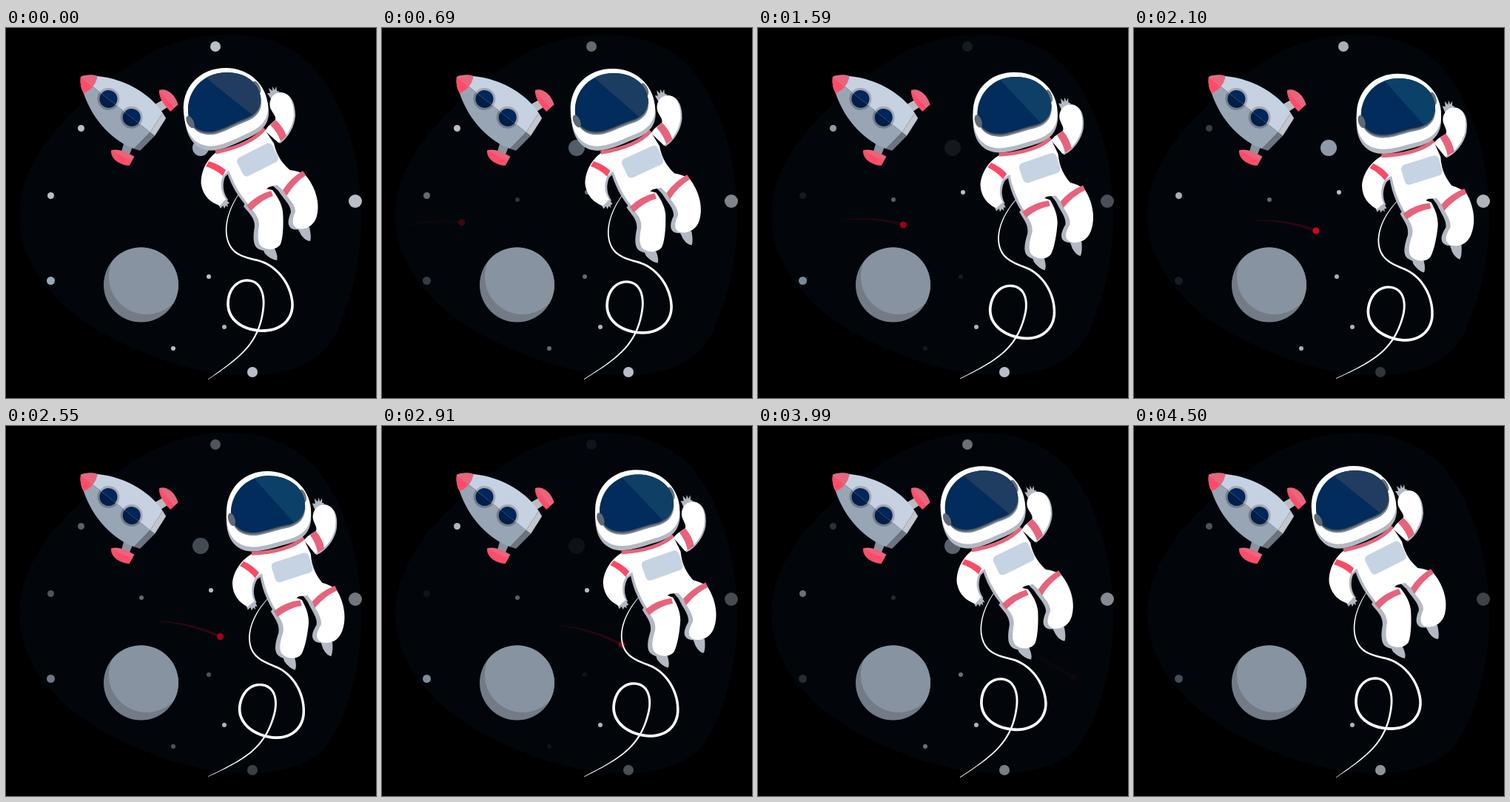
Animation, 500 px wide and 500 px high, one loop 4.53 s. Source, as an HTML page:

```html
<!DOCTYPE html>
<html lang="en">
<head>
<meta charset="utf-8">
<title>Floating astronaut</title>
<style>
html, body { margin: 0; width: 100%; height: 100%; overflow: hidden; background: #000; }
svg { display: block; width: 100%; height: 100%; }
.lit { --hull: #c6d2e2; --tail: #c4c6cf; --neck: #b9bdc4; --nose: #e8657d; --in: #ff4d69; --out: #e8657d; --rim: #a5a8ae; --glass: #00265c; }
.dim { --hull: #98a5b5; --tail: #6c757f; --neck: #8b949e; --nose: #ff4d69; --in: #e8657d; --out: #ff4d69; --rim: #737c87; --glass: #031d4a; }
</style>
</head>
<body>
<svg viewBox="0 0 500 500">
  <defs>
    <clipPath id="planetClip"><circle cx="182.500" cy="347" r="50.500"/></clipPath>
    <clipPath id="visorClip"><use href="#visor"/></clipPath>
    <path id="visor" d="M246 112C245 85 265 61 297 60C322 59 341 73 344 93C345 108 338 117 322 123C308 128 298 135 284 139C262 144 247 133 246 112Z"/>
    <path id="helmet" d="M240 114C237 80 262 54 297 54C330 54 352 78 354 105C355 127 341 136 325 143C305 152 287 162 270 159C251 155 242 138 240 114Z"/>
    <path id="armL" d="M284 168C268 180 262 200 264 213C267 228 277 236 289 240L297 231C290 222 289 210 293 200L308 186Z"/>
    <path id="armR" d="M350 139L368 155C380 147 388 132 389 117C389 103 384 87 371 87C358 88 354 101 358 110C361 116 365 119 364 124L354 133Z"/>
    <path id="legL" d="M327 239C334 248 342 254 342 266C340 278 339 291 346 296C354 301 366 300 371 292C375 282 375 260 374 248C372 235 366 227 360 219L340 215Z"/>
    <path id="legR" d="M374 219C381 230 391 238 391 248C386 260 386 268 394 271C403 273 416 269 420 254C425 235 417 213 404 198Q394 193 384 192L362 208Z"/>

    <!-- One side of the rocket, nose at the origin, axis along x -->
    <g id="side">
      <path fill="var(--neck)" d="M100 30L107 47L118 44L113 28Z"/>
      <path fill="var(--in)" d="M94 52C99 44 113 40 124 39L126 53Z"/>
      <path fill="var(--out)" d="M94 52L125 46L126 53C113 62 99 60 94 52Z"/>
      <path fill="var(--hull)" d="M0 0C4 7 10 12 17 15C51 37 90 40 117 31L120 0Z"/>
      <path fill="var(--tail)" d="M120 0L117 31L125 28L128 0Z"/>
      <path fill="var(--nose)" d="M0 0C4 7 10 12 17 15Q21 8 21 0Z"/>
      <path fill="var(--rim)" d="M33 0a15 15 0 0 0 30 0Zm40 0a15 15 0 0 0 30 0Z"/>
      <path fill="var(--glass)" d="M36 0a12 12 0 0 0 24 0Zm40 0a12 12 0 0 0 24 0Z"/>
    </g>
  </defs>

  <path fill="#02060b" d="M18 250C20 190 60 140 105 100C150 60 210 9 300 9C362 9 406 32 436 80C464 126 480 190 480 260C480 310 468 360 452 400C432 450 390 469 325 469C260 469 190 445 130 412C70 378 16 320 18 250Z"/>
  <g id="stars"></g>

  <g clip-path="url(#planetClip)">
    <rect x="130" y="294" width="106" height="106" fill="#737c86"/>
    <circle cx="190" cy="336" r="51" fill="#8793a1"/>
  </g>

  <g transform="translate(101 66) rotate(38.600)">
    <use href="#side" class="dim"/>
    <use href="#side" class="lit" transform="scale(1 -1)"/>
  </g>

  <path id="trail" fill="#c00024"/>
  <circle id="dot" r="4.600" fill="#cf0022"/>

  <g id="astronaut">
    <path id="tether" fill="#fff"/>
    <g fill="#b3b9c3">
      <path d="M345 295L350 305Q358 313 366 314Q368 309 363 298Z"/>
      <path d="M393 269L399 280Q405 288 411 288Q413 283 410 269Z"/>
      <path d="M286 237L290 244L293 240L295 244L297 240L300 242L299 238L302 237L297 231Z"/>
      <path d="M358 96L353 88L357 88L355 81L360 85L360 79L363 84L365 79L366 85L370 86Z"/>
      <use href="#legL" x="-6" y="2"/>
      <use href="#legR" x="-6" y="1"/>
      <use href="#armL" x="3" y="1"/>
      <use href="#armR" x="2" y="1"/>
      <path d="M296 186C302 210 314 230 329 245L340 225Z"/>
    </g>
    <g fill="#fff">
      <use href="#legR"/>
      <use href="#legL"/>
      <use href="#armL"/>
      <use href="#armR"/>
      <path d="M283 168C310 164 338 154 350 138L362 156C366 174 375 185 386 194L366 212L355 215L328 239C316 225 306 208 300 189Z"/>
    </g>
    <g fill="#e7637b">
      <path d="M325 240Q339 225 358 220L361 227Q345 232 331 247Z"/>
      <path d="M374 219Q384 203 401 193L405 199Q390 209 379 227Z"/>
      <path d="M364 124Q375 134 379 146L371 153Q367 141 357 131Z"/>
      <path fill="#fb4b66" d="M274 180Q288 184 297 192L293 200Q283 191 270 187Z"/>
    </g>
    <rect x="-26.500" y="-14" width="53" height="28" rx="6" fill="#c6d3e3" transform="translate(340 178) rotate(-27)"/>
    <path d="M283 168C308 163 335 153 349 136" fill="none" stroke="#e7637b" stroke-width="5"/>
    <use href="#helmet" x="1" y="6" fill="#b3b9c3"/>
    <use href="#helmet" fill="#fff"/>
    <ellipse cx="339" cy="80" rx="4" ry="9" fill="#69727d" transform="rotate(-27 339 80)"/>
    <use href="#visor" x="1" y="4" fill="#7b8591"/>
    <use href="#visor" y="2" fill="#4a5664"/>
    <use href="#visor" fill="#022c5b"/>
    <path id="glare" d="M261 60L337 121L370 50Z" clip-path="url(#visorClip)"/>
    <ellipse cx="249" cy="127" rx="4.500" ry="9" fill="#5f6975" transform="rotate(-27 249 127)"/>
  </g>
</svg>
<script>
const LOOP = 4530;
const NS = "http://www.w3.org/2000/svg";
const $ = id => document.getElementById(id);
const set = (el, attrs) => Object.entries(attrs).forEach(([k, v]) => el.setAttribute(k, v));

// Rises from 0 at a to 1 at b, back to 0 at c
const bump = (t, a, b, c) => Math.max(0, Math.min((t - a) / (b - a), (c - t) / (c - b)));

// Swings between full and low brightness, reversing at each turn time
const twinkle = (low, ...turns) => t => {
  const i = turns.findIndex(turn => turn > t);
  if (i < 1) return i ? low : 1;
  const k = (t - turns[i - 1]) / (turns[i] - turns[i - 1]);
  return low + (1 - low) * (i % 2 ? 1 - k : k);
};
const pulse = low => twinkle(low, 0, 1520, 2150, 2850, 3640, 4480);
const glow = peak => t => Math.min(1, peak * Math.sin(Math.PI * t / LOOP));

const GREY = "#b9bec7", BLUE = "#9aa6b7";
const stars = [];
function star(cx, cy, r, light, fill = GREY) {
  const el = document.createElementNS(NS, "circle");
  set(el, { cx, cy, r, fill });
  $("stars").append(el);
  stars.push({ el, light });
}
star(283, 25, 7, pulse(0));
star(263, 162, 11, pulse(0), BLUE);
star(60.5, 226.5, 4.5, pulse(0));
star(274, 336, 3, pulse(0));
star(226, 433, 3, pulse(0));
star(472, 234, 9, pulse(.33));
star(101.5, 135.5, 4.5, twinkle(.1, 1400, 2300, 2880, 3600, 6200));
star(60.5, 341.5, 5.5, twinkle(.1, 0, 950, 1450, 2130, 2750, 3600, 6000), BLUE);
star(333, 465, 7, twinkle(.22, 1590, 2130, 5500));
star(183, 232, 3, glow(.55));
star(277, 222, 3, glow(1.25));
star(295, 404, 3, () => .95);

// Closed outline around a curve whose width varies along it
function ribbon(point, width, n) {
  const left = [], right = [];
  for (let i = 0; i <= n; i++) {
    const s = i / n, p = point(s);
    const a = point(Math.max(0, s - .002)), b = point(Math.min(1, s + .002));
    const dx = b.x - a.x, dy = b.y - a.y, k = width(s) / 2 / Math.hypot(dx, dy);
    left.push((p.x - dy * k).toFixed(2) + " " + (p.y + dx * k).toFixed(2));
    right.unshift((p.x + dy * k).toFixed(2) + " " + (p.y - dx * k).toFixed(2));
  }
  return "M" + left.concat(right).join("L") + "Z";
}

const cord = document.createElementNS(NS, "path");
set(cord, { d: "M316 222C301 244 296 264 298 280C302 305 318 309 340 314C365 320 385 345 387 372C388 395 370 410 345 409C318 408 300 393 300 373C300 353 312 341 326 341C343 341 349 358 348 375C346 400 338 418 325 433C310 450 290 463 273 475" });
const cordLength = cord.getTotalLength();
set($("tether"), {
  d: ribbon(s => cord.getPointAtLength(s * cordLength), s => .7 + 3.1 * Math.sin(Math.PI * s), 140)
});

const orbit = x => 262.3 + .0009 * (x - 132) ** 2;

function drawComet(t) {
  const x = 39 + .1 * t - 7e-7 * t * t;
  set($("dot"), { cx: x, cy: orbit(x), opacity: bump(t, -100, 2100, 4200) ** 1.2 });
  // The tail bows slightly above the flight path
  const tail = s => {
    const dx = 83 * (s - 1);
    return { x: x + dx, y: orbit(x + dx) + .0016 * dx * (dx + 106) };
  };
  set($("trail"), { d: ribbon(tail, s => .6 + 3.4 * s, 16), opacity: .28 * bump(t, 300, 2400, 4300) });
}

function drawAstronaut(t) {
  const sway = (1 - Math.cos(2 * Math.PI * (t + 50) / LOOP)) / 2;
  const mix = (a, b) => Math.round(a + (b - a) * sway);
  set($("astronaut"), { transform: `rotate(${9.7 * sway} 281 475)` });
  set($("glare"), { fill: `rgb(${mix(34, 11)},${mix(60, 64)},${mix(96, 104)})` });
}

const start = performance.now();
function tick() {
  const t = (performance.now() - start) % LOOP;
  for (const { el, light } of stars) set(el, { opacity: light(t) });
  drawComet(t);
  drawAstronaut(t);
  requestAnimationFrame(tick);
}
tick();
</script>
</body>
</html>
```
